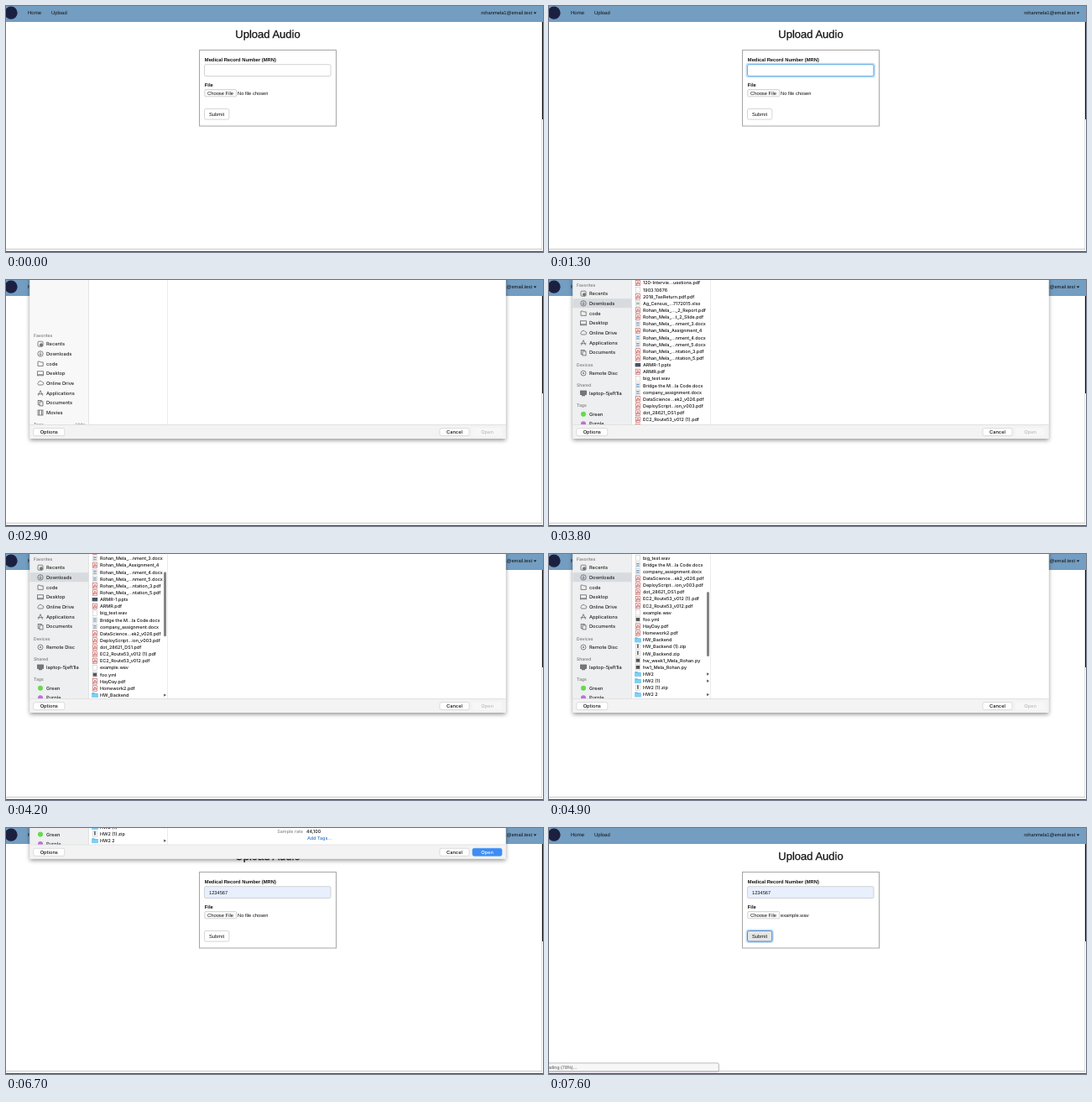
An HTML page that plays this animation: 640 px wide and 293 px high, repeating every 8000 ms.

```html
<!DOCTYPE html>
<html lang="en">
<head>
<meta charset="utf-8">
<title>Upload Audio</title>
<style>
html, body { margin: 0; width: 100%; height: 100%; overflow: hidden; background: #fff; }
svg { display: block; width: 100%; height: 100%; }
text { font-family: "Liberation Sans", Arial, sans-serif; text-rendering: geometricPrecision; white-space: pre; }
.mac text { font-family: Inter, Roboto, sans-serif; font-weight: 500; }
</style>
</head>
<body>
<svg id="stage" viewBox="0 0 640 293"></svg>
<script>
const stage = document.getElementById('stage');
const LOOP = 8000, STEP = 100, ROW = 8.14, SCROLL = 112.8;

const ramp = (t, a, b) => Math.min(1, Math.max(0, (t - a) / (b - a)));
const ease = p => p * p * (3 - 2 * p);

// Text is placed by the middle of its capitals.
const text = (x, y, s, size = 5.8, fill = '#111', more = '') =>
  `<text x="${x}" y="${y + size * 0.36}" font-size="${size}" fill="${fill}" ${more}>${s}</text>`;
const rect = (x, y, w, h, fill, more = '') =>
  `<rect x="${x}" y="${y}" width="${w}" height="${h}" fill="${fill}" ${more}/>`;
const circle = (x, y, r, fill, more = '') =>
  `<circle cx="${x}" cy="${y}" r="${r}" fill="${fill}" ${more}/>`;
const path = (d, fill, more = '') => `<path d="${d}" fill="${fill}" ${more}/>`;
const line = (color, w = 1) => `stroke="${color}" stroke-width="${w}"`;
const END = 'text-anchor="end"', MID = 'text-anchor="middle"', BOLD = 'font-weight="700"';

const files = `120-Intervie...uestions.pdf
1903.10676
2018_TaxReturn.pdf.pdf
Ag_Census_...7172015.xlsx
Rohan_Mela_..._2_Report.pdf
Rohan_Mela_...t_2_Slide.pdf
Rohan_Mela_...nment_3.docx
Rohan_Mela_Assignment_4
Rohan_Mela_...nment_4.docx
Rohan_Mela_...nment_5.docx
Rohan_Mela_...ntation_3.pdf
Rohan_Mela_...ntation_5.pdf
ARMR-1.pptx
ARMR.pdf
big_test.wav
Bridge the M...la Code.docx
company_assignment.docx
DataScience...ek2_v026.pdf
DeployScript...ion_v003.pdf
dot_28621_DS1.pdf
EC2_Route53_v012 (1).pdf
EC2_Route53_v012.pdf
example.wav
foo.yml
HayDay.pdf
Homework2.pdf
HW_Backend
HW_Backend (1).zip
HW_Backend.zip
hw_week1_Mela_Rohan.py
hw1_Mela_Rohan.py
HW2
HW2 (1)
HW2 (1).zip
HW2 2`.split('\n');
const PICK = files.indexOf('example.wav');

const isFolder = name => /^HW[^.]*$/.test(name);

function fileIcon(name, y) {
  if (isFolder(name))
    return path(`M102.3 ${y - 3}h3l.8 .9h3.6v5h-7.4z`, '#62bdea') + rect(102.3, y - 1.3, 7.4, 4.2, '#82cff3');
  const page = rect(103.3, y - 3.2, 5.2, 6.4, '#fff', line('#bbb', 0.5));
  if (/pdf$|_4$/.test(name))
    return rect(103.3, y - 3.2, 5.2, 6.4, '#fff', line('#b5504c', 0.6)) +
      path(`M104.3 ${y + 2}L106 ${y - 1.8}L107.6 ${y + 1.2}H104.6`, 'none', line('#c33a35', 0.7));
  if (/yml$|py$/.test(name)) return page + rect(103.7, y - 2, 4.4, 4, '#555');
  if (/pptx$/.test(name)) return rect(102.6, y - 2.2, 6.6, 4.4, '#4a5262');
  if (/zip$/.test(name)) return page + rect(105.2, y - 3, 1.4, 4.6, '#444');
  if (/docx$/.test(name)) return page + rect(104.2, y - 1.8, 3.4, 1.4, '#5a93cc') + rect(104.2, y + 0.6, 3.4, 1.4, '#89a');
  if (/xlsx$/.test(name)) return page + rect(104.2, y - 1.5, 3.4, 3, '#a5bda8');
  return page;
}

const thin = line('#666', 0.8);
const sideIcon = {
  Recents: y => rect(38, y - 3, 6, 6, 'none', thin + ' rx="1"') + circle(42, y + 1, 2, '#777'),
  Downloads: y => circle(41, y, 3.2, 'none', thin) + path(`M41 ${y - 2}v3.5m-1.5 -1.5l1.5 1.7l1.5 -1.7`, 'none', thin),
  code: y => path(`M38 ${y - 2.5}h2.5l.7 .8h3v4.5h-6.2z`, 'none', thin),
  Desktop: y => rect(37.5, y - 2.5, 7, 5, 'none', thin) + rect(38, y + 1, 6, 1, '#777'),
  'Online Drive': y => path(`M38.8 ${y + 2}a1.6 1.6 0 0 1 0 -3a2.3 2.3 0 0 1 4.3 -.4a1.7 1.7 0 0 1 0 3.4z`, 'none', thin),
  Applications: y => path(`M38.4 ${y + 3}L41 ${y - 3}L43.6 ${y + 3}M37.6 ${y + 1}h6.8`, 'none', thin),
  Documents: y => rect(38.2, y - 3, 4, 5, 'none', thin) + rect(40, y - 1.5, 4, 5, '#eee', thin),
  'Remote Disc': y => circle(41, y, 3, 'none', thin) + circle(41, y, 0.9, '#666'),
  'laptop-5jeft1la': y => rect(37.5, y - 3, 7, 4.4, '#777', thin) + rect(39, y + 2.2, 4, 1, '#555'),
  Movies: y => rect(38, y - 3, 6, 6, 'none', thin) + path(`M39.5 ${y - 3}v6m3 -6v6`, 'none', thin),
  Green: y => circle(41, y, 3, '#69d84f'),
  Purple: y => circle(41, y, 3, '#bf6fd6')
};
const item = (name, y) => sideIcon[name](y) + text(48, y, name, 5.7, '#222');
const heading = (name, y) => text(33, y, name, 5.1, '#777');
const favorites = ['Recents', 'Downloads', 'code', 'Desktop', 'Online Drive', 'Applications', 'Documents'];

function sidebar(loaded) {
  const top = loaded ? 0 : 60, tags = loaded ? 0 : 23;
  return rect(28, -10, 70.5, 182, loaded ? '#eeeff0' : '#f8f8f8') +
    (loaded ? rect(28, 22.2, 70.5, 11, '#d7dbe0') : '') +
    heading('Favorites', 6 + top) +
    favorites.map((name, i) => item(name, 16.2 + top + i * 11.7)).join('') +
    (loaded
      ? heading('Devices', 101) + item('Remote Disc', 111) + heading('Shared', 125) + item('laptop-5jeft1la', 135)
      : item('Movies', 158) + text(83, 172, 'Hide', 5.1, '#777')) +
    heading('Tags', 149 + tags) + item('Green', 159.8 + tags) + item('Purple', 171.3 + tags);
}

function fileList(scroll, picked, bar) {
  const rows = files.map((name, i) => {
    const y = 3.5 + i * ROW - scroll, on = picked && i === PICK;
    if (y < -5 || y > 178) return '';
    return (on ? rect(98.5, y - 4.1, 94, ROW, '#1f63d5') : '') + fileIcon(name, y) +
      text(112, y, name, 5.4, on ? '#fff' : '#111') +
      (isFolder(name) ? path(`M188 ${y - 1.7}l3.2 1.7l-3.2 1.7z`, '#666') : '');
  }).join('');
  return rows + (bar ? rect(188, 45 - (SCROLL - scroll) * 0.36, 3, 77, '#858585', 'rx="1.5"') : '');
}

function details() {
  const info = [
    ['', 'Waveform audio - 3.4 MB'], ['Created', 'Sunday, April 21, 2019 at 1:31 PM'],
    ['Modified', 'Sunday, April 21, 2019 at 1:32 PM'], ['Last opened', '--'],
    ['Duration', '00:20'], ['Sample rate', '44,100']
  ];
  return text(393.5, 99.5, 'example.wav', 7, '#111', MID) +
    info.map(([label, value], i) => {
      const y = 117.6 + i * 7.75;
      return text(354, y, label, 5.4, '#888', END) + text(358, y, value, 5.4, label ? '#111' : '#888');
    }).join('') + text(359, 163.9, 'Add Tags...', 5.4, '#2a75c8');
}

function button(x, w, label, fill = '#fff', color = '#111') {
  return rect(x, 176.6, w, 9, fill, `rx="2" ${line(fill === '#fff' ? '#c8c8c8' : fill, 0.6)}`) +
    text(x + w / 2, 181.1, label, 5.7, color, MID);
}

function sheet(t) {
  const shift = -200 * (1 - ease(ramp(t, 2500, 2843))) - 200 * ease(ramp(t, 6427, 6827));
  if (shift <= -199) return '';
  const loaded = t >= 3000, picked = t >= 5600;
  const scroll = SCROLL * ease(ramp(t, 3800, 4700));
  return `<g class="mac" transform="translate(0 ${shift})" filter="url(#shadow)">` +
    rect(28.5, -10, 567, 199, '#f3f3f3') + rect(98.5, -10, 497, 182, '#fff') +
    `<g clip-path="url(#body)">` + sidebar(loaded) +
    (t >= 3200 ? fileList(scroll, picked, t > 3800) : '') +
    (t >= 5700 ? details() : '') + '</g>' +
    rect(98.2, -10, 0.6, 182, '#d8d8d8') + rect(192.2, -10, 0.6, 182, '#dedede') +
    rect(28.5, 172, 567, 0.6, '#d6d6d6') +
    button(32.8, 37, 'Options') + button(517, 35, 'Cancel') +
    (picked ? button(556, 35, 'Open', '#3c8df4', '#fff') : button(556, 35, 'Open', '#f7f7f7', '#bbb')) + '</g>';
}

const glow = (x, y, w, h, alpha, color = '#66afe9') => alpha <= 0 ? '' :
  `<g opacity="${alpha}">` + rect(x - 1, y - 1, w + 2, h + 2, 'none', `rx="2.5" ${line('#c5dff5', 2)}`) +
  rect(x, y, w, h, 'none', `rx="2" ${line(color)}`) + '</g>';

function page(t) {
  const filled = t >= 1500, chosen = t >= 7000;
  const field = ramp(t, 900, 1300) * (1 - ramp(t, 2000, 2300));
  const chooser = (t >= 2100 && t < 3300) || (t >= 6900 && t < 7200);
  const submit = ramp(t, 7100, 7400);
  return rect(0, 0, 640, 293, '#fff') + rect(0, 0, 640, 19, '#739dc1') +
    circle(6, 8.2, 7.6, '#1c2040') +
    text(26, 8, 'Home', 6) + text(54, 8, 'Upload', 5.9) +
    text(627, 8, 'rohanmela1@email.test', 5.75, '#111', END) + path('M628.7 7.4h3.6l-1.8 2z', '#111') +
    text(312, 33.8, 'Upload Audio', 13, '#111', `${MID} ${line('#111', 0.25)}`) +
    rect(230.5, 52.5, 163, 90.5, '#fff', line('#a6a6a6')) +
    text(236.8, 64, 'Medical Record Number (MRN)', 5.8, '#111', BOLD) +
    rect(236.5, 69.7, 150.5, 13.8, filled ? '#e8effd' : '#fff', `rx="1.5" ${line('#c8c8cc', 0.8)}`) +
    glow(236.5, 69.7, 150.5, 13.8, field) + (filled ? text(242, 76.6, '1234567', 5.7) : '') +
    text(236.8, 93.6, 'File', 5.8, '#111', BOLD) +
    rect(236.8, 99.6, 37.8, 8.2, '#fbfbfb', `rx="1" ${line('#b4b4b4', 0.6)}`) +
    (chooser ? path('M237 108h38v-8.4', 'none', line('#8dbbe6', 1)) : '') +
    text(240, 103.8, 'Choose File') + text(276, 103.8, chosen ? 'example.wav' : 'No file chosen', 5.76) +
    rect(236.5, 122.5, 29.3, 12.6, submit ? '#e6e6e6' : '#fff', `rx="1.5" ${line('#ccc', 0.8)}`) +
    glow(236.5, 122.5, 29.3, 12.6, submit, '#5088c4') + text(242, 128.7, 'Submit') +
    rect(638, 19, 0.7, 271, '#d5d5d5') + rect(639, 19, 1, 116, '#111') +
    rect(0, 289.3, 639, 0.8, '#bbb') + rect(0, 292, 640, 1, '#008000');
}

function status(t) {
  return t < 7600 ? '' : rect(-3, 280, 205.3, 9.8, '#f7f7f7', `rx="1.5" filter="url(#soft)" ${line('#aaa', 0.7)}`) +
    text(-1, 285, 'ading (78%)...', 5.5, '#555');
}

const defs = `<defs>
<clipPath id="body"><rect x="28.5" y="-10" width="567" height="182"/></clipPath>
<filter id="shadow" x="-5%" y="-5%" width="110%" height="115%"><feDropShadow dx="0" dy="2" stdDeviation="2.5" flood-opacity=".42"/></filter>
<filter id="soft" x="-5%" y="-30%" width="110%" height="170%"><feDropShadow dx="0" dy=".5" stdDeviation=".7" flood-opacity=".4"/></filter>
</defs>`;

let start, shown = -1;
function draw(now) {
  start ??= now;
  const t = Math.floor((now - start) % LOOP / STEP) * STEP;
  if (t !== shown) {
    stage.innerHTML = defs + page(t) + sheet(t) + status(t);
    shown = t;
  }
  requestAnimationFrame(draw);
}
draw(performance.now());
</script>
</body>
</html>
```
